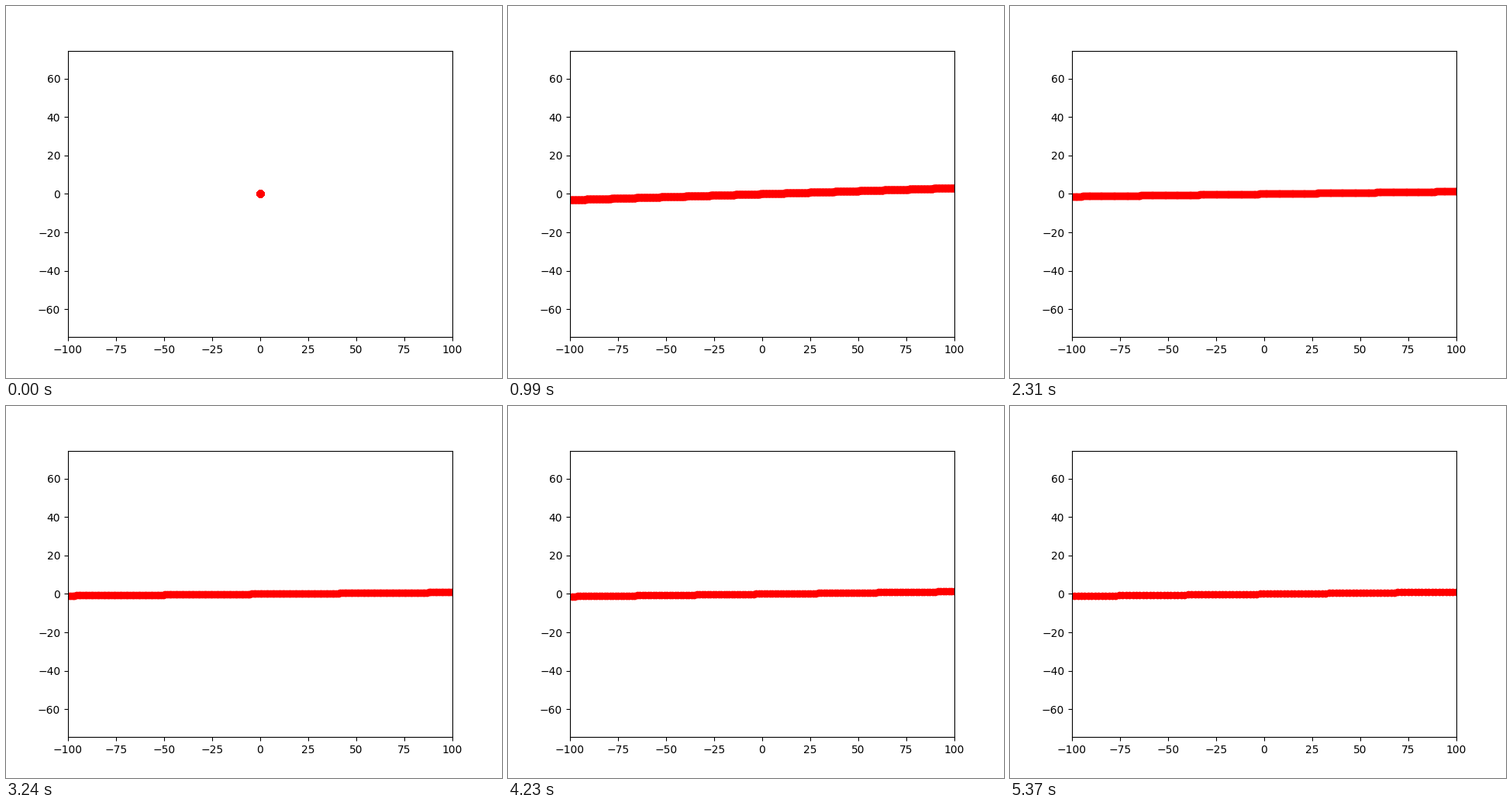
Recreate the animation shown at these times as a matplotlib script. Size 640 px wide and 480 px high, loop 5.4 s.

```python
import numpy as np
import matplotlib.pyplot as plt
from matplotlib.animation import FuncAnimation

FRAMES = 180
INTERVAL = 30

fig, ax = plt.subplots(figsize=(6.4, 4.8), dpi=100)
box = ax.get_position()
half_w = 100
# Same scale on both axes
half_h = half_w * (box.height * 4.8) / (box.width * 6.4)
ax.set_xlim(-half_w, half_w)
ax.set_ylim(-half_h, half_h)

scale = np.arange(-np.pi, np.pi, 0.01)
dots, = ax.plot([], [], "ro")


def update(t):
    """Show the point of the cubic cycloid at t for every scale."""
    dots.set_data(scale * (t - np.sin(t) ** 3),
                  scale * (1 - np.cos(t) ** 3))
    return dots,


anim = FuncAnimation(fig, update, frames=FRAMES, interval=INTERVAL,
                     repeat=True, repeat_delay=0)
plt.show()
```
